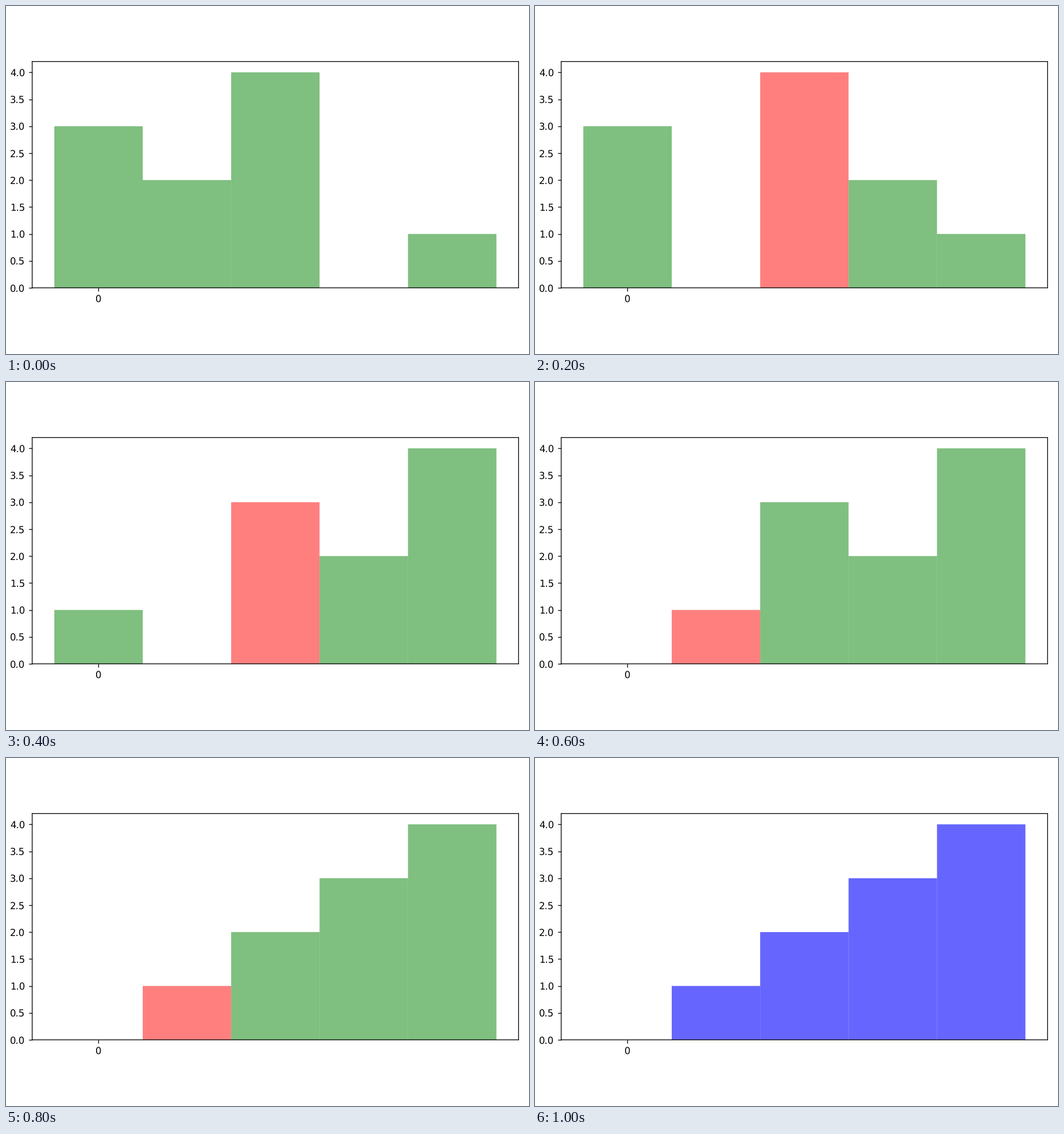
Write a matplotlib script that moves like this. It is 918x610 px and loops after 1200 ms.

```python
import matplotlib.pyplot as plt
from matplotlib.animation import FuncAnimation

WIDTH, HEIGHT, DPI = 918, 610, 120
LEFT, RIGHT, TOP, BOTTOM = 46, 899.6, 97.4, 494
LOOP_MS = 1200


def shell_sort(values):
    """Yield the list and the current gap after every insertion that moves a value."""
    values = list(values)
    yield tuple(values), None
    gap = len(values) // 2
    while gap:
        for i in range(gap, len(values)):
            value, j = values[i], i
            while j >= gap and values[j - gap] > value:
                values[j] = values[j - gap]
                j -= gap
            values[j] = value
            if j != i:
                yield tuple(values), gap
        gap //= 2
    yield tuple(values), None


steps = list(shell_sort([3, 2, 4, 0, 1]))
count = len(steps[0][0])

plt.rcParams.update({"font.family": "DejaVu Sans", "text.hinting": "none"})
fig = plt.figure(figsize=(WIDTH / DPI, HEIGHT / DPI), dpi=DPI, facecolor="white")
ax = fig.add_axes([LEFT / WIDTH, 1 - BOTTOM / HEIGHT,
                   (RIGHT - LEFT) / WIDTH, (BOTTOM - TOP) / HEIGHT])
bars = ax.bar(range(count), steps[0][0], width=1, snap=False)
ax.set(xlim=(-0.75, count - 0.25), ylim=(0, 1.05 * (count - 1)), xticks=[0],
       yticks=[i / 2 for i in range(2 * count - 1)])
ax.tick_params(axis="y", pad=3.9)

# Keep fractional edges soft instead of rounding them to whole pixels
for spine in ax.spines.values():
    spine.set_snap(False)
for line in ax.get_xticklines() + ax.get_yticklines():
    line.set_snap(False)


def bar_style(slot, gap, done):
    if done:
        return "blue", 0.6
    return ("red" if slot == gap else "green"), 0.5


def draw(step):
    heights, gap = steps[step]
    done = step == len(steps) - 1
    for slot, (bar, height) in enumerate(zip(bars, heights)):
        color, alpha = bar_style(slot, gap, done)
        bar.set(height=height, facecolor=color, alpha=alpha, visible=height > 0)
    return bars.patches


animation = FuncAnimation(fig, draw, frames=len(steps),
                          interval=LOOP_MS // len(steps),
                          repeat=True, repeat_delay=0)
plt.show()
```
